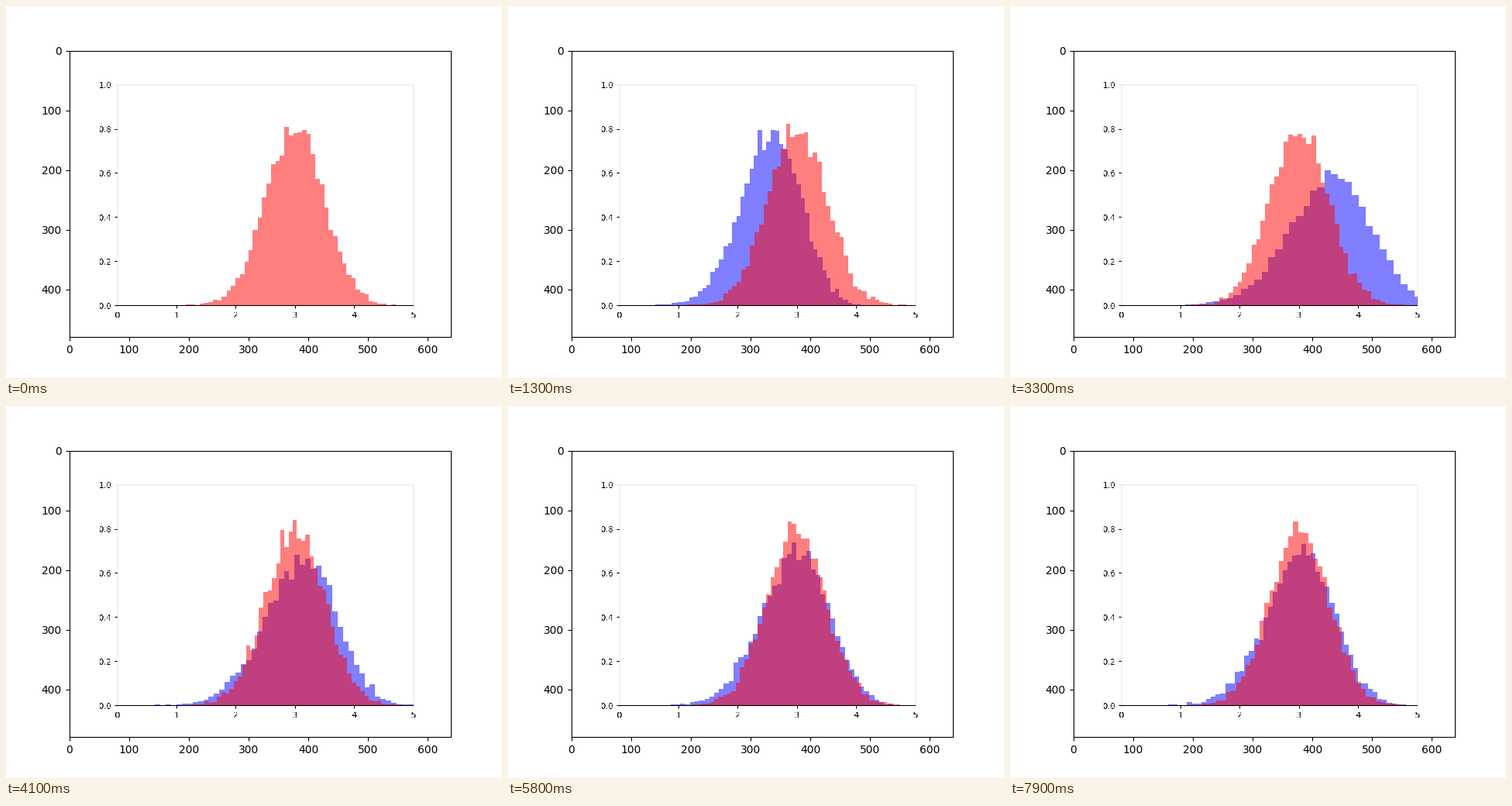
These frames come from a looping animation (640x480 px, 8 s). A matplotlib script:

```python
import numpy as np
import matplotlib.pyplot as plt
from matplotlib.animation import FuncAnimation

np.random.seed(7)

FRAMES, INTERVAL = 80, 100
SAMPLES, BINS = 10000, 50

# Learned distribution over time: seconds, mean, spread
TRACK = np.array([
    (0.0, -0.45, 0.08), (0.5, 0.50, 0.20), (1.0, 1.72, 0.35),
    (1.3, 2.55, 0.51), (1.8, 3.95, 0.72), (2.1, 4.36, 0.80),
    (2.5, 4.20, 0.79), (3.3, 3.51, 0.69), (4.1, 3.08, 0.60),
    (4.9, 2.87, 0.57), (5.8, 2.95, 0.57), (6.8, 3.03, 0.57),
    (7.9, 3.00, 0.57),
])


def real_samples():
    return np.random.normal(3, 0.5, SAMPLES)


def learned_samples(t):
    mean, spread = (np.interp(t, TRACK[:, 0], TRACK[:, k]) for k in (1, 2))
    z = np.random.normal(0, 1, SAMPLES)
    return mean + spread * (z - 0.04 * (z * z - 1))  # slight left tail


def render_plots(fig):
    """Draw every histogram at full size and return the rendered pictures."""
    ax = fig.add_subplot()
    shots = []
    for i in range(FRAMES):
        groups = (
            (learned_samples(i * INTERVAL / 1000), "blue"),
            (real_samples(), "red"),
        )
        bars = [
            ax.hist(data, BINS, density=True, alpha=0.5, color=color)[2]
            for data, color in groups
        ]
        ax.set(xlim=(0, 5), ylim=(0, 1))
        fig.canvas.draw()
        shots.append(np.array(fig.canvas.buffer_rgba())[..., :3])
        for group in bars:
            group.remove()
    fig.clear()
    return shots


fig = plt.figure(figsize=(6.4, 4.8), dpi=100)
shots = render_plots(fig)
ax = fig.add_subplot()
picture = ax.imshow(shots[0], interpolation="nearest")


def update(i):
    picture.set_data(shots[i])
    return [picture]


anim = FuncAnimation(fig, update, frames=FRAMES, interval=INTERVAL,
                     repeat=True, repeat_delay=0, blit=False)
plt.show()
```
